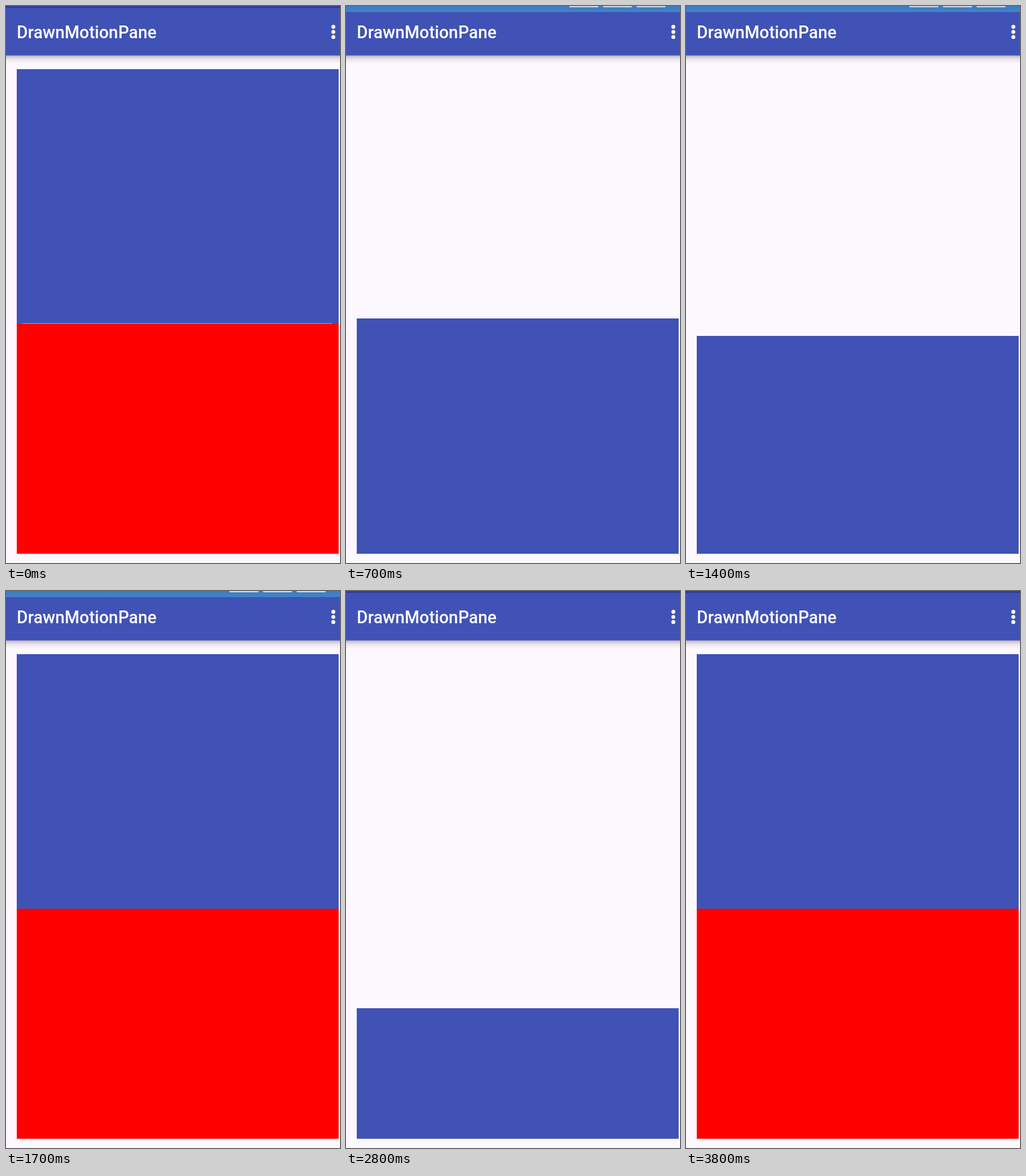
An HTML page with a canvas for the animation above (5.1 s loop, 497 by 829 pixels).

```html
<!DOCTYPE html>
<html lang="en">
<head>
<meta charset="utf-8">
<title>Sliding panel</title>
<style>
  html, body { margin: 0; width: 100%; height: 100%; overflow: hidden; background: #fcf8fd; }
  canvas { display: block; }
</style>
</head>
<body>
<canvas id="stage" width="497" height="829"></canvas>
<script>
const ctx = document.getElementById('stage').getContext('2d');
const LOOP = 5100, STEP = 100, SETTLE = 33;
const LEFT = 16, TOP = 94, WIDTH = 479, HEIGHT = 379, BOTTOM = 815.3;
const BLUE = '#4052b6', PAPER = '#fcf8fd';

const drags = [
  { start: 336, rise: 300, depth: 481, release: 1393.7 },
  { start: 2222.5, rise: 379, depth: 584, release: 3495.7 }
];

// Eases down while dragged, then springs back once released.
function dragOffset(t, { start, rise, depth, release }) {
  if (t < start) return 0;
  if (t > release) return depth * Math.exp((release - t) / SETTLE);
  return depth * (1 - Math.exp(-(((t - start) / rise) ** 2)));
}

const ramp = (t, start, length) => Math.min(1, Math.max(0, (t - start) / length));

function rect(color, x, y, w, h) {
  ctx.fillStyle = color;
  ctx.fillRect(x, y, w, h);
}

function gradient(y0, y1, ...colors) {
  const g = ctx.createLinearGradient(0, y0, 0, y1);
  colors.forEach((c, i) => g.addColorStop(i / (colors.length - 1), c));
  return g;
}

function drawOverlay(alpha) {
  ctx.globalAlpha = alpha;
  rect(gradient(0, 9, '#3d7bc3', '#4284c8'), 0, 0, 497, 9);
  ctx.fillStyle = '#c9d5e6';
  for (let i = 0; i < 3; i++) {
    ctx.beginPath();
    ctx.roundRect(332 + 50 * i, -4, 44, 6, 2);
    ctx.fill();
  }
  ctx.globalAlpha = 1;
}

function drawAppBar(overlay) {
  rect(gradient(73, 86, 'rgba(60,45,60,.36)', 'rgba(90,70,90,.1)', 'rgba(90,70,90,0)'), 0, 73, 497, 13);
  rect(BLUE, 0, 0, 497, 73.6);
  rect('#303f9f', 0, 0, 497, 3);
  drawOverlay(overlay);
  ctx.fillStyle = '#fff';
  ctx.font = '500 25.2px Roboto, sans-serif';
  ctx.fillText('DrawnMotionPane', 16, 48);
  for (let i = 0; i < 3; i++) {
    ctx.beginPath();
    ctx.arc(487.1, 31 + 7.6 * i, 2.9, 0, Math.PI * 2);
    ctx.fill();
  }
}

function drawPanel(y, divider) {
  const edge = Math.min(y + HEIGHT, BOTTOM);
  rect(BLUE, LEFT, y, WIDTH, edge - y);
  rect('#f00', LEFT, edge, WIDTH, BOTTOM - edge);
  if (divider) rect('#8f9cc4', 24, 472, 461, 1);
}

function draw(now) {
  const t = Math.floor(now % LOOP / STEP) * STEP;
  const offset = drags.reduce((sum, drag) => sum + dragOffset(t, drag), 0);
  rect(PAPER, 0, 0, 497, 829);
  drawPanel(Math.round(TOP + offset), t < drags[0].start);
  drawAppBar(ramp(t, 300, 300) - ramp(t, 2200, 220));
}

const start = performance.now();
function tick() {
  draw(performance.now() - start);
  requestAnimationFrame(tick);
}
tick();
</script>
</body>
</html>
```
